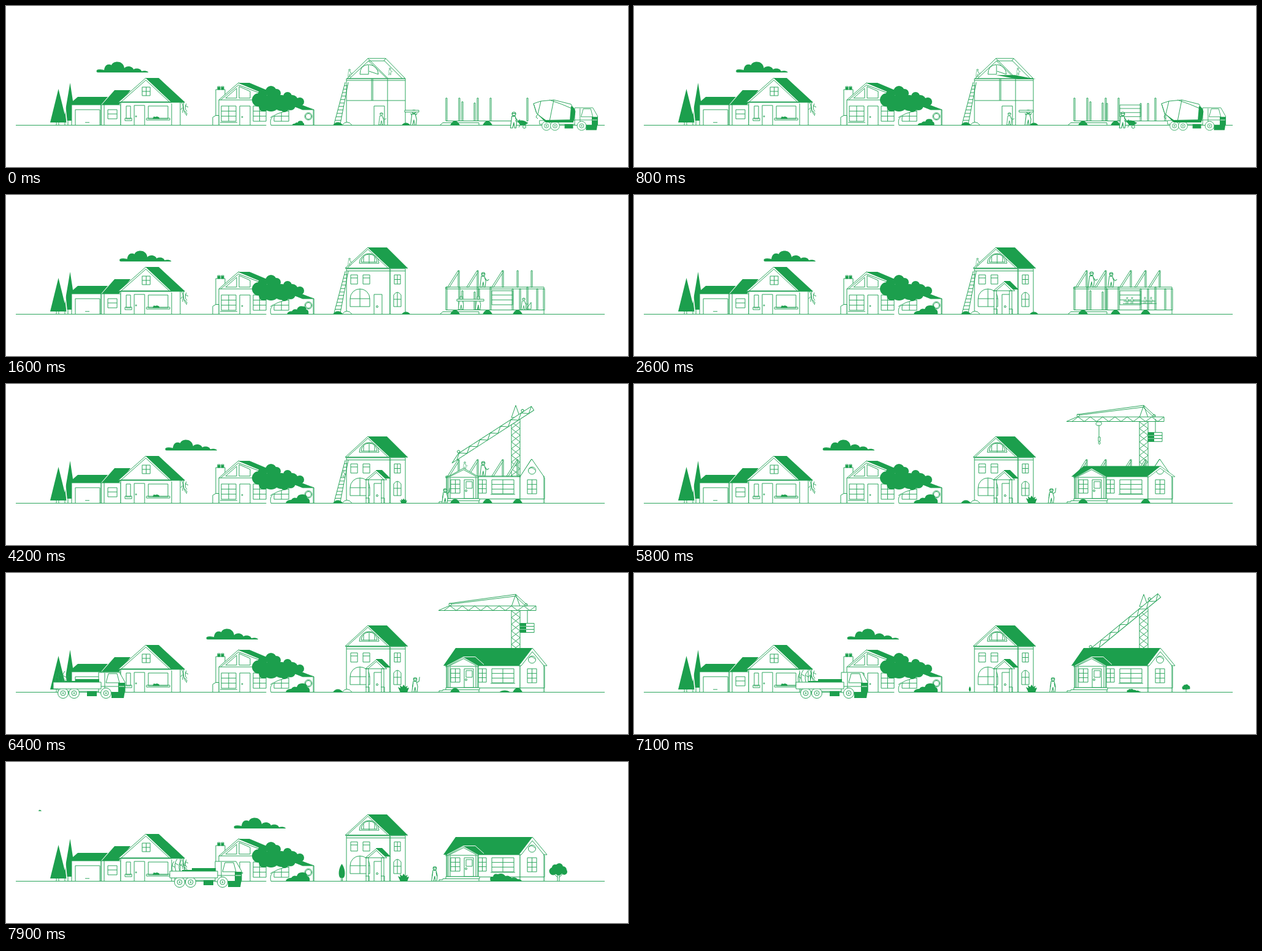
Write an HTML page that moves like this. It is 1014 px wide and 264 px high and loops after 8 s.

```html
<!DOCTYPE html>
<html lang="en">
<head>
<meta charset="utf-8">
<title>Street under construction</title>
<style>
html, body { margin: 0; width: 100%; height: 100%; overflow: hidden; background: #fff; }
svg { display: block; width: 100%; height: 100%; }
path { stroke: #2ba55c; stroke-width: 1; stroke-linejoin: round; fill: none; }
.wall { fill: #fff; }
.solid { fill: #1c9f4d; stroke: none; }
.blank { fill: #fff; stroke: none; }
</style>
</head>
<body>
<svg viewBox="0 0 1014 264">
  <defs>
    <clipPath id="sky"><path d="M0 0H1014V152H0z"/></clipPath>
    <clipPath id="road"><path d="M8 0H970V264H8z"/></clipPath>
  </defs>
</svg>
<script>
const LOOP = 8000, STEP = 100;
const stage = document.querySelector('svg');
const parts = [];

const node = (parent, name, attrs = {}) => {
  const el = document.createElementNS('http://www.w3.org/2000/svg', name);
  for (const key in attrs) el.setAttribute(key, attrs[key]);
  return parent.appendChild(el);
};
const group = (parent = stage, attrs) => node(parent, 'g', attrs);
const draw = (parent, kind, ...shapes) => node(parent, 'path', { class: kind, d: shapes.join('') });
const line = (g, ...s) => draw(g, 'line', ...s);
const wall = (g, ...s) => draw(g, 'wall', ...s);
const solid = (g, ...s) => draw(g, 'solid', ...s);

const box = (x, y, r, b) => `M${x} ${y}H${r}V${b}H${x}z`;
const disc = (x, y, r) => `M${x - r} ${y}a${r} ${r} 0 1 0 ${2 * r} 0a${r} ${r} 0 1 0 ${-2 * r} 0z`;
const pane = (x, y, r, b, rows = 2) => {
  let d = box(x, y, r, b) + `M${(x + r) / 2} ${y}V${b}`;
  for (let i = 1; i < rows; i++) d += `M${x} ${y + (b - y) * i / rows}H${r}`;
  return d;
};
const mound = (x, y, w, h) => `M${x - w} ${y}Q${x - w * .6} ${y - h} ${x} ${y - h}T${x + w} ${y}z`;
const zigzag = (x, y, dx, dy, sx, sy, n) => {
  let d = `M${x} ${y}`;
  for (let i = 1; i <= n; i++) d += `L${x + sx * i + (i % 2) * dx} ${y + sy * i + (i % 2) * dy}`;
  return d;
};

// Piecewise linear value of a [time, value] track
const at = (keys, t) => {
  const i = keys.findIndex(k => k[0] > t);
  if (i < 0) return keys[keys.length - 1][1];
  if (i === 0) return keys[0][1];
  const [a, x] = keys[i - 1], [b, y] = keys[i];
  return x + (y - x) * (t - a) / (b - a);
};
const timed = (el, update) => (parts.push(t => update(el, t)), el);
const show = (el, from, to = LOOP) =>
  timed(el, (e, t) => e.setAttribute('visibility', t >= from && t < to ? 'visible' : 'hidden'));
const move = (el, xs, ys = [[0, 0]]) =>
  timed(el, (e, t) => e.setAttribute('transform', `translate(${at(xs, t)} ${at(ys, t)})`));
const grow = (el, x, y, keys, wide = true) => timed(el, (e, t) => {
  const s = at(keys, t);
  e.setAttribute('visibility', s > 0 ? 'visible' : 'hidden');
  e.setAttribute('transform', `translate(${x} ${y}) scale(${wide ? s : 1} ${s}) translate(${-x} ${-y})`);
});

const person = (parent, x, y, h, arm = 'M2-15l4 5 3-2') => {
  const g = group(parent, { transform: `translate(${x} ${y}) scale(${h / 24})` });
  wall(g, 'M-3-17h5l2 8-1 9h-2l-1-8-2 8h-3l1-9z', disc(0, -20.5, 2.6));
  line(g, arm, 'M-3-21h6');
  return g;
};
const WAVE = 'M2-15l4-2 1-7M-3-15l-1 7';
const CARRY = 'M2-15l3-3M-3-15l-2-3';

// Ground, clouds
line(stage, 'M16 195.5H976');
const cloudShape = 'M1 108.5C-1 104 4 103 13 105 14 96 20 94 25 97 27 90 44 88 46 102 50 97 59 99 61 104 66 101 73 103 74 107 79 105 85 107 85 109L3 109z';
const bud = group();
solid(bud, 'M53 80.5q0-2 2-2t3 2z');
show(bud, 7800);

// House with garage
function garageHouse() {
  const g = group();
  solid(g, 'M104.500 126L94 188H114z', 'M85.500 136L72 191H99z');
  line(g, 'M86 191v4M82 191v4M96 188v7M101 188v7');
  draw(g, 'blank', 'M94 152l2 0 4 39h-1.500z');
  wall(g, box(107, 162, 155, 195.5), box(155, 162, 187, 195.5));
  solid(g, 'M102 162L117 149H166L155 162z', 'M156 162L177 138H203L184 162z');
  line(g, box(113, 170, 153, 195.5), 'M129 191h7', box(166, 170, 181, 185), 'M166 177h15M160 162v33');
  wall(g, box(187, 157, 284, 195.5), 'M183 158L228 118L270 158z');
  line(g, 'M188 157L228 121.500L266 157M183 158H291');
  solid(g, 'M228 118H249L292 158H270z');
  line(g, pane(222, 133, 235, 147), box(196, 164, 203, 185), box(194, 184, 205, 188),
    box(209, 163, 226, 195.5), disc(212, 181, 1), box(232, 164, 264, 185), box(229, 184, 267, 187), 'M270 160v35');
  solid(g, 'M239 185l2-4 2 1q4-2 7 1v2z');
  line(g, 'M286 158q4 5 2 17M290 158q-3 8 3 20M294 160q-4 8 1 13M287 167l-2 3M292 163l5 3M291 172l4 4-1 4');
}

// House behind the leafy tree
function gableHouse() {
  const g = group();
  wall(g, box(342, 137, 357, 181), box(345, 132, 349, 137), box(351, 132, 355, 137));
  solid(g, box(345, 133, 349, 137), box(351, 133, 355, 137));
  wall(g, 'M347 195.500V154L379 126L502 170V195.500z');
  wall(g, 'M337 195.500v-13l5-3h5v16z');
  line(g, 'M350 154L379 129.500L484 170M347 154H405M501 170v25');
  solid(g, 'M378 126H397L502 170.500H484z');
  line(g, 'M358 151L376 135V151z', 'M380 132L398 140V151H380z', pane(351, 164, 375, 189, 3), 'M349 191h28',
    box(381, 164, 398, 195.5), disc(385, 182, 1), pane(403, 164, 424, 189, 3), pane(437, 164, 461, 189, 3),
    disc(493, 181, 6), disc(493, 181, 4.5));
  draw(g, 'blank', 'M424 197C427 186 424 180 430 172H456C438 177 431 184 432 197z');
  line(g, 'M432 195.500C429 184 434 178 455 173M431 183q3-4 8-2');
  const leaves = [[412, 154, 11], [418, 145, 7.5], [432, 140, 9], [441, 143, 7], [459, 148, 7], [467, 155, 9],
    [479, 157, 7], [432, 159, 14], [449, 159, 13], [464, 163, 8], [420, 165, 8], [454, 167, 7]];
  solid(g, ...leaves.map(l => disc(...l)));
  const bush = group(g);
  solid(bush, 'M456 195.500Q457 190 465 190 468 185 474 187 476 180 484 181 491 181 491 187 496 188 495 195.500z');
  grow(bush, 477, 195.5, [[0, .5], [1600, .9], [2400, 1]]);
}

// Tall house, first a frame, then finished
function tallHouse() {
  const frame = group();
  wall(frame, box(555, 119, 651, 195.5), 'M556 119L590 86H619L651 119z');
  line(frame, 'M560 119L591 90L621 119M590 86L623 119M619 86l-3 4M591 90H617L646 119M555 155H651M596 119V155M598 119V155M622 119V195',
    'M555 122H651M600 195V164H617V195M591 96V112H577Q577 97 591 96M592 96Q606 98 607 112L592 107');
  person(frame, 626, 113, 12);
  person(frame, 612, 195, 21);
  show(frame, 0, 1200);
  const carrier = group();
  person(carrier, 665, 195.5, 26, CARRY);
  wall(carrier, box(650, 171, 673, 174));
  move(carrier, [[0, 0], [900, -25]]);
  show(carrier, 0, 900);

  const shell = group();
  wall(shell, box(555, 121, 626, 195.5), box(626, 121, 651, 195.5), 'M553 120L590 86L626 120z');
  line(shell, 'M557 119L590 89L622 119M553 120H655M555 124.500H651');
  show(shell, 900);
  const roof = group();
  solid(roof, 'M590 86H621L655 120H626z');
  grow(roof, 622, 120, [[700, 0], [1200, 1]], false);
  const details = group();
  line(details, 'M576 112A16 16 0 0 1 608 112zM579 110A13 13 0 0 1 605 110zM592 97V112M583 101V110M601 101V110',
    box(562, 131, 573, 146), 'M562 136h11', box(582, 131, 593, 146), 'M582 136h11', pane(633, 131, 643, 146),
    'M561 183V170A16 16 0 0 1 593 170V183zM577 154V183M561 170H593',
    'M632 183V164Q638 155 644 164V183zM638 160V183M632 171H644');
  line(details, box(600, 163, 613, 195.5), disc(605, 183, 1.5));
  show(details, 1200);
  const porch = group();
  wall(porch, 'M586 157L604 142L621 157z', box(587, 157, 591, 195.5), box(612, 157, 616, 195.5));
  line(porch, 'M590 157L604 145L616 157M586 187h6v8M611 187h6v8');
  solid(porch, 'M603 141H613L627 155H618z');
  grow(porch, 605, 195.5, [[1900, 0], [2400, 1]], false);

  const ladder = group();
  let rungs = 'M553 125L535 193M558 125L545 193';
  for (let i = 1; i < 12; i++) rungs += `M${553 - i * 1.5} ${125 + i * 5.67}L${558 - i * 1.08} ${125 + i * 5.67}`;
  line(ladder, rungs);
  show(ladder, 0, 5700);
  const climber = group();
  person(climber, 560, 116, 13);
  move(climber, [[2700, 0], [4200, -10], [5000, -15], [5500, -19]], [[2700, 0], [4200, 38], [5000, 59], [5500, 78]]);
  show(climber, 0, 5600);

  const heaps = group();
  wall(heaps, mound(556, 195.5, 8, 5));
  solid(heaps, mound(541, 195.5, 8, 5));
  grow(heaps, 548, 195.5, [[6500, 1], [7000, 0]]);
  const heap = group();
  solid(heap, mound(652, 195.5, 7, 4));
  show(heap, 0, 3800);
  const shrub = group();
  solid(shrub, 'M643 196L639 187 643 189 642 184 646 187 648 183 651 187 655 185 653 189 657 188 654 196z');
  grow(shrub, 648, 196, [[3600, 0], [4200, .65], [4800, 1]]);
  const sapling = group();
  solid(sapling, 'M547.500 167C553 174 554 187 550 190H545C541 187 542 174 547.500 167z');
  line(sapling, 'M546.500 190v5M548.500 190v5');
  grow(sapling, 547.5, 195.5, [[6900, 0], [7500, 1]]);
}

function crane() {
  const tower = group(group(stage, { 'clip-path': 'url(#sky)' }));
  line(tower, 'M824 58V180M838 58V180', zigzag(824, 62, 14, 0, 0, 11, 10), zigzag(838, 62, -14, 0, 0, 11, 10));
  wall(tower, 'M824 55L831 35L838 55z');
  const sink = [[3600, 135], [4000, 0], [7200, 0], [7600, 135]];
  timed(tower, (e, t) => e.setAttribute('transform', `translate(0 ${at(sink, t)})`));
  show(tower, 3600, 7600);
  const jib = group(tower);
  wall(jib, 'M705 61.500L722 54H864V61.500z');
  line(jib, zigzag(714, 61.5, 0, -7.5, 10, 0, 15), disc(724, 51.5, 2), disc(848, 52, 2));
  const tilt = [[3600, -50], [4000, -40], [4200, -33], [4800, 0], [6500, 0], [7200, -46]];
  timed(jib, (e, t) => e.setAttribute('transform', `rotate(${at(tilt, t)} 831 58)`));
  const ties = group(tower);
  line(ties, 'M722 50L831 35L850 53M726 51L830 38L846 53');
  show(ties, 4700, 6600);
  const load = group(tower);
  line(load, 'M850 45V67');
  wall(load, box(838, 67, 861, 72), box(838, 72, 861, 77), box(838, 77, 861, 82));
  solid(load, box(838, 67, 848, 82));
  draw(load, 'line', 'M838 72h10M838 77h10').style.stroke = '#8dcca6';
  move(load, [[0, 0]], [[5000, 0], [6000, 15.5]]);
  show(load, 4800, 6700);
  const hook = group(tower);
  wall(hook, 'M755 62h6q3 4-1 6h-5q-4-2 0-6z', box(757, 87, 760, 94));
  line(hook, 'M758 68V87M758.500 94q-3 2 0 5 3-1 1-4');
  show(hook, 4800, 5900);
}

// Long house, from posts to planting
function longHouse() {
  const post = (x, top) => box(x - 1, top, x + 1, 188.5);
  const frame = group();
  line(frame, ...[718, 739, 769, 790, 850].map(x => post(x, 151)), post(744, 157), post(764, 159),
    'M717 188.500H826M708 195L712 191.500H771V195');
  const more = group(frame);
  line(more, ...[771, 826, 838, 866, 877].map(x => post(x, 154)), 'M717 188.500H877V195', 'M792 157V180H826V157zM792 164H826M792 172H826');
  grow(more, 790, 188.5, [[300, 0], [900, 1]], false);
  show(line(frame, box(717, 151, 877, 154)), 900);
  show(frame, 0, 3300);

  const crew = group();
  person(crew, 742, 188, 23, CARRY);
  person(crew, 770, 188, 23, CARRY);
  wall(crew, box(735, 171, 779, 174));
  person(crew, 844, 188, 20);
  line(crew, 'M848 187l8-11v11z');
  show(crew, 1300, 2000);
  const bench = group();
  [804, 812, 833, 843].forEach(x => person(bench, x, 178, 11));
  line(bench, 'M798 174H850M797 178H852');
  show(bench, 2200, 3000);

  [738, 769, 810, 834, 857].forEach((x, i) => {
    const rafter = group();
    wall(rafter, box(x - 1, 124, x + 1, 151));
    grow(rafter, x, 151, [[900 + i * 100, 0], [1200 + i * 100, 1]], false);
    timed(rafter, (e, t) => { if (t >= 6000) e.setAttribute('visibility', 'hidden'); });
    const brace = group();
    wall(brace, `M${x - 1} 124L${x - 18} 151h3L${x} 127z`);
    show(brace, i < 3 ? 1100 + i * 150 : 1500 + (i - 2) * 300, 6000);
  });

  show(person(stage, 778, 151, 25), 1300, 5700);
  show(person(stage, 746, 151, 26), 2000, 3200);
  show(person(stage, 748, 140, 13), 3200, 5700);

  const front = group();
  wall(front, box(718, 152, 838, 195.5));
  line(front, 'M718 188.500H838', pane(792, 157, 828, 180, 3), pane(770, 157, 783, 179, 3), 'M790 181h40');
  show(front, 3000);
  const gable = group();
  wall(gable, box(838, 152, 877, 195.5), 'M838 152L857 123L877 152z');
  draw(gable, 'blank', 'M839 151h37v3h-37z');
  line(gable, 'M838 188.500H877', disc(857.5, 142, 6), 'M853 139q5-4 9 2', pane(850, 157, 865, 180, 3));
  grow(gable, 857, 195.5, [[2800, 0], [3400, 1]], false);

  const roof = group();
  solid(roof, 'M733 123H859L838 152H713z');
  wall(roof, 'M836 152L858 123L882 152H877L858 129L840 152z');
  grow(roof, 790, 152, [[5500, 0], [6000, 1]], false);
  const porch = group();
  wall(porch, 'M719 153L746 138L770 152V188H719z');
  line(porch, 'M717 153H771M723 152L746 140.500L767 152M721 153V188M724 153V188M766 153V188M769 153V188',
    pane(725, 157, 740, 179, 3), box(747, 157, 762, 188), box(750, 160, 760, 171), disc(750, 175, 1.5));
  wall(porch, box(717, 188, 772, 191.5), 'M706 195.500V193H712V191.500H771V195.500z');
  grow(porch, 745, 195.5, [[3100, 0], [3600, 1]], false);
  const seam = group();
  draw(seam, 'line', 'M719 152L746 137.500H765L779 150').style.stroke = '#fff';
  show(seam, 6000);

  [[732, 0, 6900], [785, 0, 4800], [834, 1000, 6700]].forEach(([x, from, to]) => {
    const heap = group();
    solid(heap, mound(x, 195.5, 8, 7));
    show(heap, from, to);
  });
  const pile = group();
  solid(pile, mound(813, 195.5, 9, 3));
  show(pile, 6200, 6700);
  const bush = group();
  solid(bush, 'M790 195.500Q787 187 794 188 795 182 802 184 810 181 814 187 820 185 824 190 831 188 834 192 840 192 841 195.500z');
  grow(bush, 815, 195.5, [[6700, 0], [7600, 1]]);
  const tree = group();
  solid(tree, disc(892, 179, 6.5), disc(895, 173, 5), disc(902, 172, 6), disc(908, 177, 6), disc(901, 180, 6), disc(910, 180, 5));
  line(tree, 'M899 195V184M902 195V184M899 189l-6-6M902 189l6-6');
  grow(tree, 900, 195.5, [[6700, 0], [7600, 1]]);
}

function walkers() {
  const barrow = group();
  person(barrow, 828, 200, 27);
  wall(barrow, disc(845, 198, 2.5));
  solid(barrow, 'M834 189Q842 185 851 192L846 195H838z');
  line(barrow, 'M830 188L846 196M838 195l-2 4M851 191l-5 4');
  move(barrow, [[0, 0], [900, -35]]);
  show(barrow, 0, 1000);

  const foreman = group();
  show(person(foreman, 0, 195.5, 25, WAVE), 4000, 6800);
  show(person(foreman, 0, 195.5, 25, 'M2-15l1 7M-3-15l-1 7'), 6800);
  move(foreman, [[4000, 718], [4200, 716], [4800, 694], [5400, 694], [6200, 667], [6600, 667], [7600, 699]]);
}

// Lorry drawn from its rear end at x = 0
function lorry(parent, wheels) {
  wall(parent, box(10, 187, 84, 194));
  wall(parent, 'M76 196V163H110L119 179V196z');
  line(parent, 'M88 180L92 165H106L110 180zM86 164V194M76 186H112');
  solid(parent, 'M108 180H119V193L117 205H97V195H108z', box(57, 194, 73, 202));
  draw(parent, 'line', 'M109 186h9').style.stroke = '#fff';
  wheels.forEach(x => wall(parent, disc(x, 197, 8.5), disc(x, 197, 4), disc(x, 197, 1)));
}

function traffic() {
  const road = group(stage, { 'clip-path': 'url(#road)' });
  const mixer = group(road);
  const body = group(mixer, { transform: 'translate(861 25.100) scale(.87)' });
  lorry(body, [23, 39, 89]);
  wall(mixer, 'M860 160L872 156 893 154 921 161 928 173 925 187 908 190 879 188 865 176z');
  line(mixer, 'M860 160L865 176M872 156L867 177M893 154L886 189M886 154Q905 160 927 170M867 177l-3 5 3 3');
  solid(mixer, 'M866 177L880 187 925 186 925 191H880zM921 164Q928 166 928 175L926 188H919z');
  timed(mixer, (e, t) => e.setAttribute('transform', `translate(${125 * Math.max(0, (t - 900) / 600) ** 2} 0)`));
  show(mixer, 0, 1600);

  const flatbed = group(road);
  lorry(flatbed, [18, 36, 88]);
  wall(flatbed, box(2, 179, 80, 190));
  solid(flatbed, 'M38 174H77V179H22V177H38z');
  line(flatbed, 'M6 179q-2-10 3-16M12 179q-4-12 2-20M18 179q-3-12 3-18M26 179q-2-10 2-16M6 170l5 3M11 166l5 3M18 168l5 3M25 169l4 2');
  timed(flatbed, (e, t) => {
    const park = Math.min(1, Math.max(0, (t - 6400) / 800));
    const x = 75 + (t < 6400 ? .475 * (t - 6400) : 190 * park * (2 - park));
    e.setAttribute('transform', `translate(${x} 0)`);
  });
  show(flatbed, 5900);
}

garageHouse();
gableHouse();
tallHouse();
crane();
longHouse();
walkers();
traffic();
const cloud = group();
solid(cloud, cloudShape);
move(cloud, [[0, 147], [1600, 184.5], [2600, 211], [4200, 259], [5000, 282], [6400, 326], [7900, 371]]);

const started = performance.now();
function tick() {
  const t = Math.floor((performance.now() - started) % LOOP / STEP) * STEP;
  parts.forEach(update => update(t));
  requestAnimationFrame(tick);
}
tick();
</script>
</body>
</html>
```
